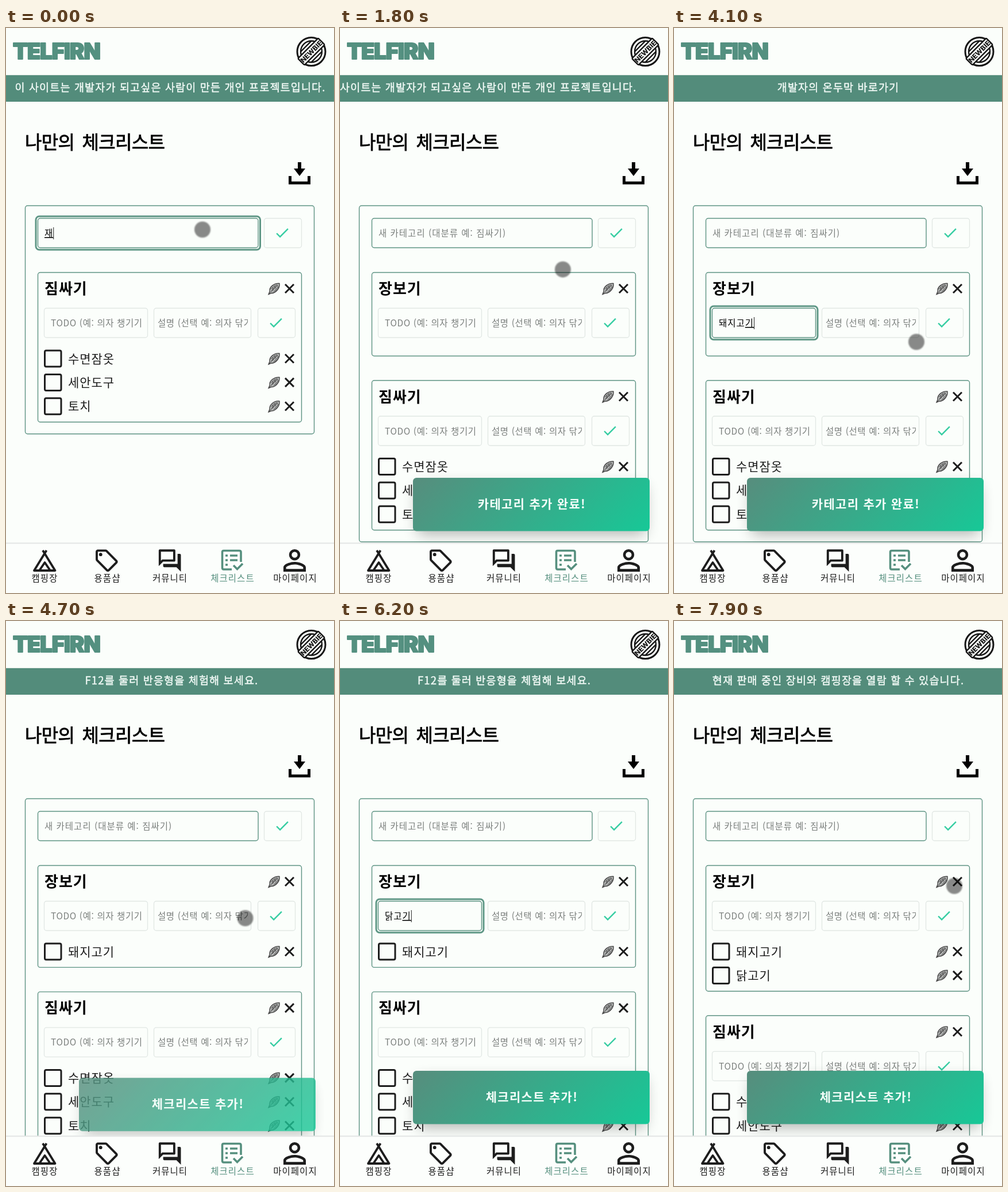
These frames come from a looping animation (571x981 px, 8000 ms). An HTML page:

```html
<!DOCTYPE html>
<html lang="ko">
<head>
<meta charset="utf-8">
<title>체크리스트</title>
<style>
  html, body { margin: 0; width: 100%; height: 100%; overflow: hidden; background: #fbfefb; }
  svg { display: block; font-family: 'Noto Sans CJK KR', 'Noto Sans CJK JP', 'Noto Sans CJK', sans-serif; }
  .teal { fill: none; stroke: #5c9282; stroke-width: 1.4; }
  .pale { fill: none; stroke: #e1e7e4; stroke-width: 1.3; }
  .ring { fill: none; stroke: #5f9786; stroke-width: 3; }
  .ink { fill: none; stroke: #1d1d1d; stroke-width: 3; }
  .heading { font-size: 26px; font-weight: 700; letter-spacing: 1px; }
  .item { font-size: 21px; letter-spacing: .9px; fill: #1d1d1d; }
  .field { font-size: 15.5px; letter-spacing: 1px; }
  .hint { fill: #7b7f7d; }
  .tight { letter-spacing: .6px; }
  .banner { font-size: 18.5px; letter-spacing: 1.15px; fill: #f1faf6; stroke: #f1faf6; stroke-width: .45; text-anchor: middle; }
  .toast { font-size: 21px; font-weight: 700; letter-spacing: 1.3px; fill: #f4fffa; text-anchor: middle; }
  .nav { font-size: 15.5px; letter-spacing: 1px; text-anchor: middle; fill: #1d1d1d; }
  .nav .active { fill: #558f7e; }
</style>
</head>
<body>
<svg id="stage" width="571" height="981" viewBox="0 0 571 981">
  <defs>
    <linearGradient id="mint" gradientUnits="userSpaceOnUse" x1="207" y1="701" x2="459" y2="953">
      <stop offset="0" stop-color="#578d7d"/><stop offset="1" stop-color="#17c897"/>
    </linearGradient>
    <filter id="soft" x="-20%" y="-50%" width="140%" height="220%"><feGaussianBlur stdDeviation="13"/></filter>
    <filter id="blur" x="-30%" y="-30%" width="160%" height="160%"><feGaussianBlur stdDeviation=".9"/></filter>
    <clipPath id="disc"><circle r="18"/></clipPath>
    <g id="quill">
      <path d="M-10 10 L-8 5 C-9 -3 0 -10 9 -9 C10 -1 3 8 -5 8 Z" fill="#b4b6b5" stroke="#3c3c3c" stroke-width="1.3"/>
      <path d="M-9 9 L6 -6 M-6 1 L1 -6 M-5 4 L4 -7 M-1 6 L8 -4 M2 5 L8 -1 M-3 -2 L-2 3 M1 -5 L2 0 M5 -7 L5 -3" fill="none" stroke="#444"/>
    </g>
    <path id="cross" d="M-7.5 -7.5 L7.5 7.5 M7.5 -7.5 L-7.5 7.5" class="ink"/>
    <path id="tick" fill="#36cda2" transform="scale(1.22) translate(-12.2 -12.3)" d="M9 16.2L4.8 12l-1.4 1.4L9 19 21 7l-1.4-1.4z"/>
  </defs>

  <rect width="571" height="981" fill="#fbfefb"/>
  <text x="12" y="54" font-family="Inter, 'Open Sans', sans-serif" font-size="38" font-weight="900" letter-spacing="-1" fill="#549080" stroke="#549080" stroke-width="2" stroke-linejoin="round">TELFIRN</text>
  <g transform="translate(531.5 41)" stroke="#161616" fill="none">
    <circle r="24.5" stroke-width="3"/>
    <circle r="18.5" stroke-width="2.4"/>
    <g transform="rotate(-45)">
      <path clip-path="url(#disc)" stroke-width="2.4" d="M-18 -13 H18 M-18 13 H18"/>
      <rect x="-25" y="-8" width="50" height="16" rx="2" fill="#fbfefb" stroke-width="2.4"/>
      <text y="4.4" font-family="Inter, sans-serif" font-size="12" font-weight="800" fill="#161616" stroke="none" text-anchor="middle">NEWBIE</text>
    </g>
  </g>
  <path d="M0 81.5 H571" stroke="#dfe7e3"/>
  <rect y="82" width="571" height="46" fill="#538c7b"/>
  <g id="banner"></g>

  <text x="33" y="210" font-size="32" letter-spacing="-.7" word-spacing="5" stroke="#000" stroke-width=".8">나만의 체크리스트</text>
  <path d="M508 233 H514 V244 H521 L511 257 L501 244 H508 Z"/>
  <path d="M494.5 257 V269 H527.5 V257" fill="none" stroke="#000" stroke-width="5"/>

  <g id="list"></g>
  <g id="toast">
    <rect x="135" y="795" width="396" height="84" rx="6" fill="#000" opacity=".3" filter="url(#soft)"/>
    <rect x="127" y="781" width="412" height="92.5" rx="6" fill="url(#mint)"/>
    <text id="message" class="toast" x="334" y="834"></text>
  </g>

  <rect y="894" width="571" height="87" fill="#fcfefc"/>
  <path d="M0 894.5 H571" stroke="#e3e6e5" stroke-width="2"/>
  <path fill="none" stroke="#1d1d1d" stroke-width="3.8" stroke-linejoin="round" d="M64 907 L85.5 942 H49 L70.5 907 M58 942 L67.5 928 L77 942"/>
  <g fill="#1d1d1d">
    <g transform="translate(152.2 901.6) scale(1.93)">
      <path d="M21.41 11.58l-9-9C12.05 2.22 11.55 2 11 2H4c-1.1 0-2 .9-2 2v7c0 .55.22 1.05.59 1.42l9 9c.36.36.86.58 1.41.58s1.05-.22 1.41-.59l7-7c.37-.36.59-.86.59-1.41s-.23-1.06-.59-1.42zM13 20.01L4 11V4h7v-.01l9 9-7 7.02z"/>
      <circle cx="6.5" cy="6.5" r="1.5"/>
    </g>
    <path transform="translate(262 901.5) scale(1.93)" d="M15 4v7H5.17L4 12.17V4h11m1-2H3c-.55 0-1 .45-1 1v14l4-4h10c.55 0 1-.45 1-1V3c0-.55-.45-1-1-1zm5 4h-2v9H6v2c0 .55.45 1 1 1h11l4 4V7c0-.55-.45-1-1-1z"/>
    <path transform="translate(473.2 895.2) scale(2.44)" d="M12 5.9a2.1 2.1 0 110 4.2 2.1 2.1 0 010-4.2m0 9c2.97 0 6.1 1.46 6.1 2.1v1.1H5.9V17c0-.64 3.13-2.1 6.1-2.1M12 4a4 4 0 100 8 4 4 0 000-8zm0 9c-2.67 0-8 1.34-8 4v3h16v-3c0-2.66-5.33-4-8-4z"/>
  </g>
  <path fill="none" stroke="#558f7e" stroke-width="3.6" d="M393 940 H379 Q376.5 940 376.5 937 V910 Q376.5 907.5 379 907.5 H406 Q409 907.5 409 910 V927 M382 916 H386 M382 924 H386 M382 932 H386 M390 916 H403 M390 924 H403 M396 933 L402.5 939.5 L412 930"/>
  <g class="nav">
    <text x="67.5" y="961">캠핑장</text><text x="176.5" y="961">용품샵</text><text x="285.5" y="961">커뮤니티</text>
    <text x="394.5" y="961" class="active">체크리스트</text><text x="503.5" y="961">마이페이지</text>
  </g>
  <circle id="pointer" r="14" fill="#000" fill-opacity=".46" filter="url(#blur)"/>
</svg>
<script>
const LOOP = 8000, WIDTH = 571;
const el = id => document.getElementById(id);

const banners = ['이 사이트는 개발자가 되고싶은 사람이 만든 개인 프로젝트입니다.',
  '개발자의 온두막 바로가기', 'F12를 둘러 반응형을 체험해 보세요.',
  '현재 판매 중인 장비와 캠핑장을 열람 할 수 있습니다.'];
const slides = [1720, 4220, 6720], SLIDE_MS = 500;

const ADD_CATEGORY = 1180, ADD_FIRST = 4480, ADD_SECOND = 6950;
// Typed text by time; null means the field has no focus.
const categoryTyping = [[0, '재'], [150, 'ㅈ'], [250, '자'], [380, '장'], [560, '장ㅂ'], [660, '장보'],
  [760, '장보ㄱ'], [860, '장보기'], [1130, null]];
const todoTyping = [[0, null], [2150, ''], [2350, 'ㄷ'], [2450, '도'], [2550, '돼'], [2650, '됒'], [2800, '돼지'],
  [2950, '돼직'], [3100, '돼지고'], [3250, '돼지곡'], [3400, '돼지고기'], [ADD_FIRST, null],
  [5080, ''], [5400, 'ㄷ'], [5500, '다'], [5600, '달'], [5700, '닭'], [5850, '닭ㄱ'], [5950, '닭고'],
  [6050, '닭곡'], [6150, '닭고기'], [ADD_SECOND, null]];
const pointerPath = [[0, 342, 350], [850, 342, 350], [1120, 484, 362], [1300, 488, 367], [1600, 488, 367],
  [2100, 206, 514], [2250, 206, 514], [2500, 250, 495], [3700, 250, 495], [4100, 422, 545], [4400, 469, 515],
  [4580, 469, 515], [5000, 208, 520], [5200, 206, 524], [6400, 206, 524], [6850, 469, 515],
  [7150, 469, 515], [7550, 488, 460], [8000, 488, 460]];

const clamp = x => Math.min(1, Math.max(0, x));
const easeOut = x => 1 - (1 - clamp(x)) ** 3;
const easeInOut = x => { x = clamp(x); return x * x * (3 - 2 * x); };
const stepAt = (steps, t) => steps.filter(s => s[0] <= t).pop()[1];

const box = (cls, x, y, w, h, r = 4) =>
  `<rect class="${cls}" x="${x + .5}" y="${y + .5}" width="${w}" height="${h}" rx="${r}"/>`;
const text = (cls, x, y, s) => `<text class="${cls}" x="${x}" y="${y}">${s}</text>`;
const use = (id, x, y) => `<use href="#${id}" x="${x}" y="${y}"/>`;
const tools = y => use('quill', 467, y) + use('cross', 493.5, y);

function field(x, y, w, pad, hint, typed, border, hintStyle = 'field hint') {
  const focused = typed !== null;
  let out = box(focused ? 'teal' : border, x, y, w, 51);
  if (focused) out += box('ring', x - 3.5, y - 3.5, w + 7, 58, 6);
  const left = x + pad, base = y + 32;
  if (typed) {
    out += text('field', left, base,
      `${typed.slice(0, -1)}<tspan text-decoration="underline">${typed.slice(-1)}</tspan>`);
  } else {
    // A nested viewport clips the hint at the padding edge.
    out += `<svg x="${left}" y="${y}" width="${w - pad - (pad > 9 ? 10 : 5)}" height="51" overflow="hidden">` +
      text(hintStyle, 0, 32, hint) + '</svg>';
  }
  if (focused) {
    const caret = left + typed.length * 15.26;
    out += `<path d="M${caret + .5} ${y + 16} V${y + 37}" stroke="#222"/>`;
  }
  return out;
}

const cardHeight = items => items.length ? 136 + 41.4 * items.length : 145.5;

function card(y, title, items, typed) {
  let out = box('teal', 55, y, 459, cardHeight(items) - .5) + text('heading', 67, y + 38, title) + tools(y + 28.5) +
    field(66, y + 62, 180, 12, 'TODO (예: 의자 챙기기)', typed, 'pale', 'field hint tight') +
    field(257, y + 62, 169, 7, '설명 (선택 예: 의자 닦기)', null, 'pale', 'field hint tight') +
    box('pale', 438, y + 62, 65, 51) + use('tick', 470, y + 88);
  items.forEach((name, i) => {
    const mid = y + 150 + 41.4 * i;
    out += `<rect class="ink" x="67.5" y="${mid - 14}" width="28.5" height="28" rx="2.5"/>` +
      text('item', 108, mid + 7.5, name) + tools(mid);
  });
  return out;
}

function listMarkup(t) {
  const packing = ['수면잠옷', '세안도구', '토치'];
  const shopping = [];
  if (t >= ADD_FIRST) shopping.push('돼지고기');
  if (t >= ADD_SECOND) shopping.push('닭고기');
  let y = 424, out = '';
  if (t >= ADD_CATEGORY) {
    out += card(y, '장보기', shopping, stepAt(todoTyping, t));
    y += cardHeight(shopping) + 42;
  }
  out += card(y, '짐싸기', packing, null);
  const bottom = y + cardHeight(packing) + 20;
  return box('teal', 33, 308, 503, bottom - 308) +
    field(55, 330, 383.5, 12, '새 카테고리 (대분류 예: 짐싸기)', stepAt(categoryTyping, t), 'teal') +
    box('pale', 449, 330, 65, 51) + use('tick', 481, 356) + out;
}

function drawToast(t) {
  const second = t >= ADD_FIRST;
  const shown = second ? easeOut((t - ADD_FIRST - 50) / 400)
    : easeOut((t - ADD_CATEGORY - 20) / 400) * (1 - easeInOut((t - 4220) / 300));
  el('message').textContent = second ? '체크리스트 추가!' : '카테고리 추가 완료!';
  el('toast').setAttribute('opacity', shown);
  el('toast').setAttribute('transform', `translate(0 ${65 * (1 - shown)})`);
}

function drawPointer(t) {
  const i = Math.max(1, pointerPath.findIndex(p => p[0] > t));
  const [t0, x0, y0] = pointerPath[i - 1], [t1, x1, y1] = pointerPath[i];
  const k = easeInOut((t - t0) / (t1 - t0));
  const pointer = el('pointer');
  pointer.setAttribute('cx', x0 + (x1 - x0) * k);
  pointer.setAttribute('cy', y0 + (y1 - y0) * k);
  pointer.setAttribute('visibility', t > 5380 && t < 6420 ? 'hidden' : 'visible');
}

el('banner').innerHTML = banners.map((s, i) => text('banner', 286 + i * WIDTH, 110, s)).join('');

let lastList = '';
function draw(t) {
  const markup = listMarkup(t);
  if (markup !== lastList) el('list').innerHTML = lastList = markup;
  const page = slides.reduce((sum, start) => sum + easeInOut((t - start) / SLIDE_MS), 0);
  el('banner').setAttribute('transform', `translate(${-page * WIDTH} 0)`);
  drawToast(t);
  drawPointer(t);
}

const began = performance.now();
function play() {
  draw((performance.now() - began) % LOOP);
  requestAnimationFrame(play);
}
play();
</script>
</body>
</html>
```
